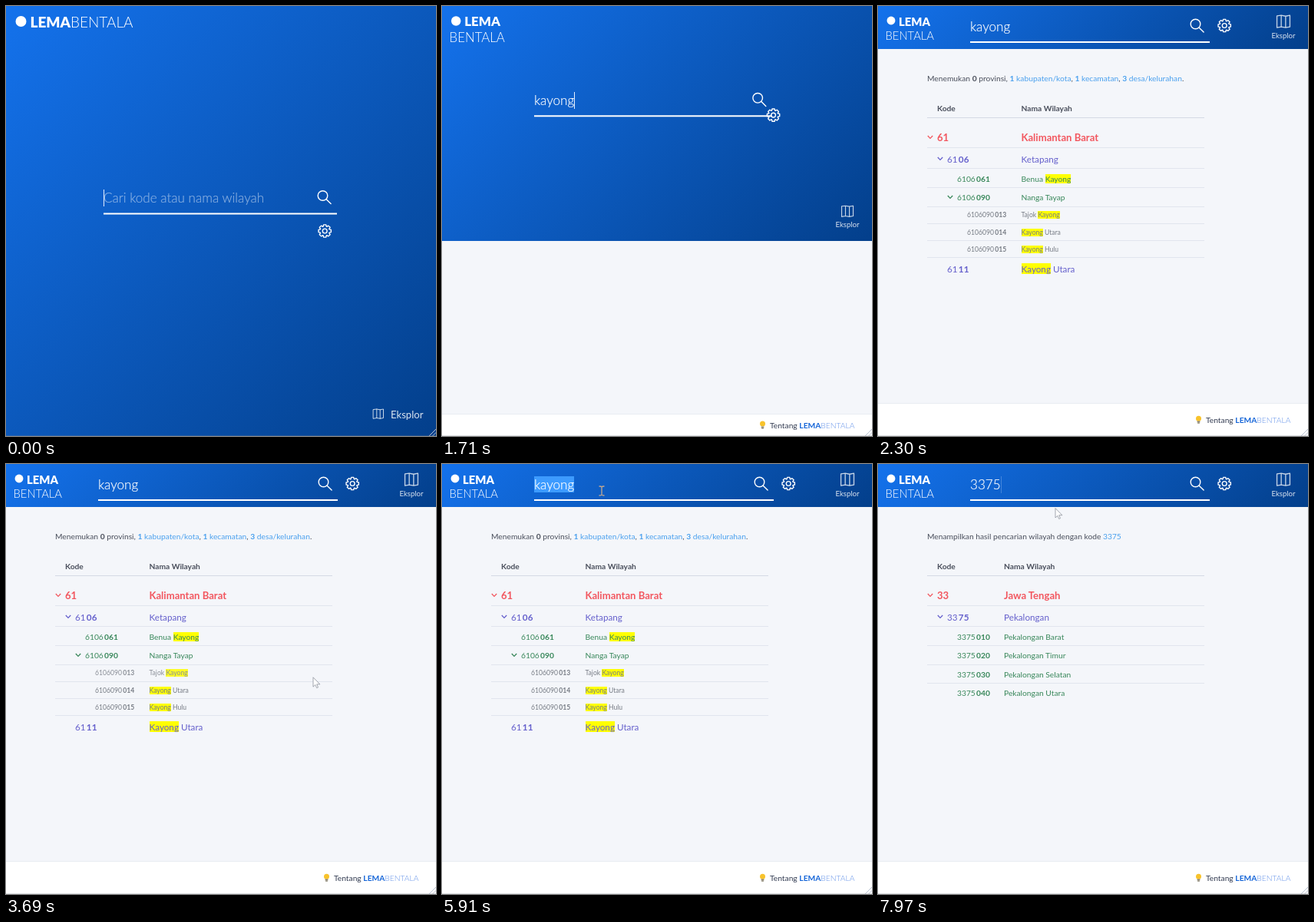
Write an HTML page that moves like this. It is 560x560 px and loops after 8000 ms.

```html
<!DOCTYPE html>
<html lang="id">
<head>
<meta charset="utf-8">
<title>Pencarian wilayah</title>
<style>
html, body { margin: 0; width: 100%; height: 100%; overflow: hidden; }
body { position: relative; background: #f4f6fa; font-family: Lato, sans-serif; color: #4a4f5c; }
div, svg { position: absolute; }
#stage { left: 0; top: 0; width: 560px; height: 560px; overflow: hidden; }
#hero { left: 0; top: 0; width: 560px; background: linear-gradient(135deg, #1472ec, #033f8b); }
#foot { left: 0; width: 560px; height: 60px; background: #fff; border-top: 1px solid #e9ecf2; box-sizing: border-box; }
#top { left: 0; top: 0; width: 560px; height: 560px; }
.t { line-height: 20px; white-space: pre; }
.w { color: #fff; }
.light { font-weight: 300; }
b { font-weight: 700; }
#brand1 { font-weight: 900; }
#field { line-height: 22px; font-size: 17.07px; font-weight: 300; white-space: pre; color: #fff; -webkit-text-stroke: .2px; }
#hint { left: 0; top: 0; opacity: .5; }
#caret { position: absolute; top: 0; width: 1px; height: 22px; background: #e4eeff; }
.sel { background: #3d9bff; }
#explore { right: 16.5px; color: #fff; opacity: .85; }
.table { left: 0; top: 0; width: 560px; height: 560px; }
.line { left: 64px; width: 361px; height: 1px; background: #e1e5ee; }
.head { background: #d4d9e5; }
.row { left: 0; top: 0; }
.row b { margin-left: 1.3px; }
.hot { opacity: .85; }
mark { background: #ff0; color: inherit; }
.l0 { color: #f2575f; font-weight: 700; }
.l1 { color: #6560cc; }
.l2 { color: #38875a; }
.l3 { color: #777c85; }
.link, .link b { color: #4aa0ee; }
#load { font-size: 14px; left: 228px; top: 122px; color: #5a5f6b; }
</style>
</head>
<body>
<div id="stage">
  <div id="found" class="table"></div>
  <div id="coded" class="table"></div>
  <div id="load" class="t">Memuat...</div>
  <div id="hero"></div>
  <div id="brand1" class="t w">LEMA</div>
  <div id="brand2" class="t w light">BENTALA</div>
  <div id="field"><div id="hint">Cari kode atau nama wilayah</div><span id="query"></span><i id="caret"></i></div>
  <div id="explore" class="t">Eksplor</div>
  <div id="foot">
    <div id="about" class="t" style="left:427px;font-size:10.25px;color:#333c52">Tentang <span style="color:#1565d8"><b>LEMA</b></span><span class="light" style="color:#5f8fe8">BENTALA</span></div>
  </div>
  <svg id="top" viewBox="0 0 560 560" fill="none" stroke-linecap="round" stroke-linejoin="round">
    <circle id="dot" r="7" fill="#fff"/>
    <rect id="rule" height="2" fill="#fff"/>
    <g id="find" stroke="#fff" stroke-width="1.4"><circle cx="-2.2" cy="-2" r="6.3"/><path d="M2.5 2.8 8.4 8.6"/></g>
    <g id="gear" stroke="#fff" stroke-width="1.4"><path id="teeth"/><circle r="2.9"/></g>
    <path id="map" stroke="#fff" stroke-opacity=".78" stroke-width="1"
      d="M-6.5-5.5-2.2-6 2.2-5.2 6.5-6V5.5L2.2 6.3-2.2 5.5-6.5 6.3ZM-2.2-6V5.5M2.2-5.2V6.3"/>
    <g id="bulb"><circle cy="-1.3" r="3.5" fill="#f8c32c"/><path d="M-1.4 2.8H1.4M-1 4.5H1" stroke="#8b8470" stroke-width="1.4"/></g>
    <g id="spin" stroke="#5f6470" stroke-width="1.1">
      <path id="half" d="M-1.8 5.8A6 6 0 0 1-2.6-5.4M-4.6-6.2-2.3-5.5-3.2-3.2"/>
      <use href="#half" transform="rotate(180)"/>
    </g>
    <path id="arrow" d="M0 0V12L2.8 9.4 4.7 13.5 6.5 12.7 4.7 8.7H8.5Z" fill="#fff" stroke="#8d929c" stroke-width=".8"/>
    <path id="beam" d="M-3-6Q-.5-6 0-5Q.5-6 3-6M0-5V5M-3 6Q-.5 6 0 5Q.5 6 3 6" stroke="#c2a892" stroke-width="1.3"/>
    <path d="M551 560 560 551M555.5 560 560 555.5" stroke="#b9c1d1" stroke-width="1"/>
    <path d="M0 559.5H560" stroke="#808894" stroke-opacity=".25"/>
  </svg>
</div>
<script>
const $ = id => document.getElementById(id);
const clamp = v => Math.max(0, Math.min(1, v));
const mix = (a, b, p) => a + (b - a) * p;
const LOOP = 8000;

const text = (x, y, size, cls, html) =>
  `<div class="t ${cls}" style="left:${x}px;top:${y - 10}px;font-size:${size}px">${html}</div>`;
const line = (y, cls = '') => `<div class="line ${cls}" style="top:${y}px"></div>`;
const chevron = (x, y) =>
  `<svg width="8" height="6" style="left:${x}px;top:${y - 3}px" fill="none" stroke="currentColor" stroke-width="1.3"><path d="M.8 1 4 4.4 7.2 1"/></svg>`;

function row(nameX, [y, level, parent, code, name, open]) {
  const size = [13.1, 11.7, 10.25, 8.6][level];
  const x = 77 + 13 * level;
  const label = name.replace('Kayong', '<mark>Kayong</mark>');
  const number = parent ? `${parent}<b>${code}</b>` : code;
  return `<div class="row l${level}" data-y="${y}">` + (open ? chevron(x - 13.3, y) : '') +
    text(x, y, size, '', number) + text(nameX, y, size, '', label) + '</div>';
}

function table(id, nameX, caption, rows, lines) {
  $(id).innerHTML = text(64, 93.5, 10.25, '', caption) +
    text(77, 133, 10.25, '', '<b>Kode</b>') + text(nameX, 133, 10.25, '', '<b>Nama Wilayah</b>') +
    line(145, 'head') + lines.map(y => line(y)).join('') + rows.map(r => row(nameX, r)).join('');
}

const link = (n, s) => `<span class="link"><b>${n}</b> ${s}</span>`;
table('found', 186.5,
  `Menemukan <b>0</b> provinsi, ${link(1, 'kabupaten/kota')}, ${link(1, 'kecamatan')}, ${link(3, 'desa/kelurahan')}.`, [
  [171, 0, '', '61', 'Kalimantan Barat', 1],
  [198.5, 1, '61', '06', 'Ketapang', 1],
  [224.5, 2, '6106', '061', 'Benua Kayong'],
  [249, 2, '6106', '090', 'Nanga Tayap', 1],
  [272, 3, '6106090', '013', 'Tajok Kayong'],
  [294.5, 3, '6106090', '014', 'Kayong Utara'],
  [316.5, 3, '6106090', '015', 'Kayong Hulu'],
  [341.5, 1, '61', '11', 'Kayong Utara']
], [184, 211, 236, 261, 283, 305, 327]);
table('coded', 164, 'Menampilkan hasil pencarian wilayah dengan kode <span class="link">3375</span>', [
  [171, 0, '', '33', 'Jawa Tengah', 1],
  [198.5, 1, '33', '75', 'Pekalongan', 1],
  [224.5, 2, '3375', '010', 'Pekalongan Barat'],
  [249, 2, '3375', '020', 'Pekalongan Timur'],
  [273.5, 2, '3375', '030', 'Pekalongan Selatan'],
  [298, 2, '3375', '040', 'Pekalongan Utara']
], [184, 211, 236, 261, 285]);
const foundRows = [...$('found').querySelectorAll('.row')];

let teeth = '';
for (let i = 0; i < 8; i++)
  for (const [da, r] of [[-.36, 6.2], [-.19, 8.3], [.19, 8.3], [.36, 6.2]]) {
    const a = i * Math.PI / 4 + da;
    teeth += `${teeth ? 'L' : 'M'}${(r * Math.cos(a)).toFixed(2)} ${(r * Math.sin(a)).toFixed(2)}`;
  }
$('teeth').setAttribute('d', teeth + 'Z');

// Pointer stops: time, x, y
const path = [
  [2860, 544, 214], [3610, 400, 275], [3690, 400, 278], [4100, 404, 345], [4400, 404, 345],
  [4970, 279, 116], [5230, 219, 48], [5310, 215, 42], [5450, 208, 35], [5560, 208, 35],
  [5650, 212, 38], [5780, 212, 38], [5900, 208, 35], [7890, 208, 35], [7900, 224, 50], [7970, 231, 58]
];

function pointer(t) {
  const i = path.findIndex(s => s[0] > t);
  if (i === 0) return null;
  if (i < 0) return path[path.length - 1].slice(1);
  const a = path[i - 1], b = path[i], k = (t - a[0]) / (b[0] - a[0]);
  return [mix(a[1], b[1], k), mix(a[2], b[2], k)];
}

const put = (id, x, y, extra = '') => $(id).setAttribute('transform', `translate(${x} ${y}) ${extra}`);
const show = (id, on) => { $(id).style.display = on ? '' : 'none'; };
const place = (id, x, y, size) => {
  const s = $(id).style;
  if (x !== null) s.left = x + 'px';
  s.top = y - 10 + 'px';
  s.fontSize = size + 'px';
};

const keys = [6140, 6310, 6390, 6540];
function typed(t) {
  if (t < 6140) return 'kayong'.slice(0, t < 770 ? 0 : 1 + Math.floor((t - 770) / 82));
  return '3375'.slice(0, keys.filter(k => t >= k).length);
}

function caret(t) {
  if (t >= 7050) return .25;
  const on = t < 520 || (t >= 770 && t < 1790) || (t >= 5600 && t < 5750) || t >= 6140;
  return on ? 1 : 0;
}

function layout(t) {
  const wide = t < 1330;
  const k = clamp((t - 1397) / 626);
  const p = k < .5 ? 4 * k ** 3 : 1 - 4 * (1 - k) ** 3;
  const h = 560 - 504 * p;
  $('hero').style.height = h + 'px';

  const logo = mix(19, 14.8, p);
  put('dot', mix(19.5, 17, p), mix(20, 19, p), `scale(${mix(1, .78, p)})`);
  place('brand1', mix(31.5, 27, p), mix(21, 20, p), logo);
  place('brand2', wide ? 84 : 9.5, wide ? 21 : mix(44.5, 37.5, p), logo);

  const left = wide ? 127 : 120;
  const right = wide ? 431 : 424 + 8 * Math.sqrt(p);
  const y = Math.max(h / 2 - 31, 25.5);
  $('field').style.left = left + 'px';
  $('field').style.top = y - 9.7 + 'px';
  put('rule', left, y + 20.5);
  $('rule').setAttribute('width', right - left);
  put('find', right - 16.3, y);
  put('gear', right - 15.8 + 35 * p, y + (wide ? 44 : mix(41, 0, p)));

  if (wide) {
    put('map', 485, 531);
    place('explore', null, 531.5, 13.1);
  } else {
    put('map', 528, h - mix(41, 36, p), `scale(${mix(1, 1.3, p)})`);
    place('explore', null, h - mix(24, 17, p), 9.6);
  }

  const fh = mix(15.5, 43, p), top = Math.max(560 - fh, h);
  show('foot', !wide);
  show('bulb', !wide);
  $('foot').style.top = top + 'px';
  $('about').style.top = fh / 2 - 10.5 + 'px';
  put('bulb', 417.5, top + fh / 2);
}

function render(t) {
  layout(t);
  const q = typed(t);
  $('query').textContent = q;
  $('query').className = t >= 5750 && t < 6140 ? 'sel' : '';
  show('hint', !q);
  $('caret').style.opacity = caret(t);

  $('found').style.opacity = t < 6700 ? clamp((t - 2160) / 130) : 0;
  $('coded').style.opacity = clamp((t - 6980) / 110);
  const busy = t >= 6700 && t < 6990;
  show('load', busy);
  show('spin', busy);
  put('spin', 206, 131, `rotate(${(t - 6700) * .36})`);

  const at = pointer(t);
  const beam = t >= 5310 && t < 7900;
  show('arrow', at && !beam);
  show('beam', at && beam);
  if (at) put(beam ? 'beam' : 'arrow', ...at);
  for (const r of foundRows)
    r.classList.toggle('hot', !!at && at[0] < 425 && Math.abs(at[1] - r.dataset.y) < 11.5);
}

const start = performance.now();
function tick() {
  render((performance.now() - start) % LOOP);
  requestAnimationFrame(tick);
}
tick();
</script>
</body>
</html>
```
